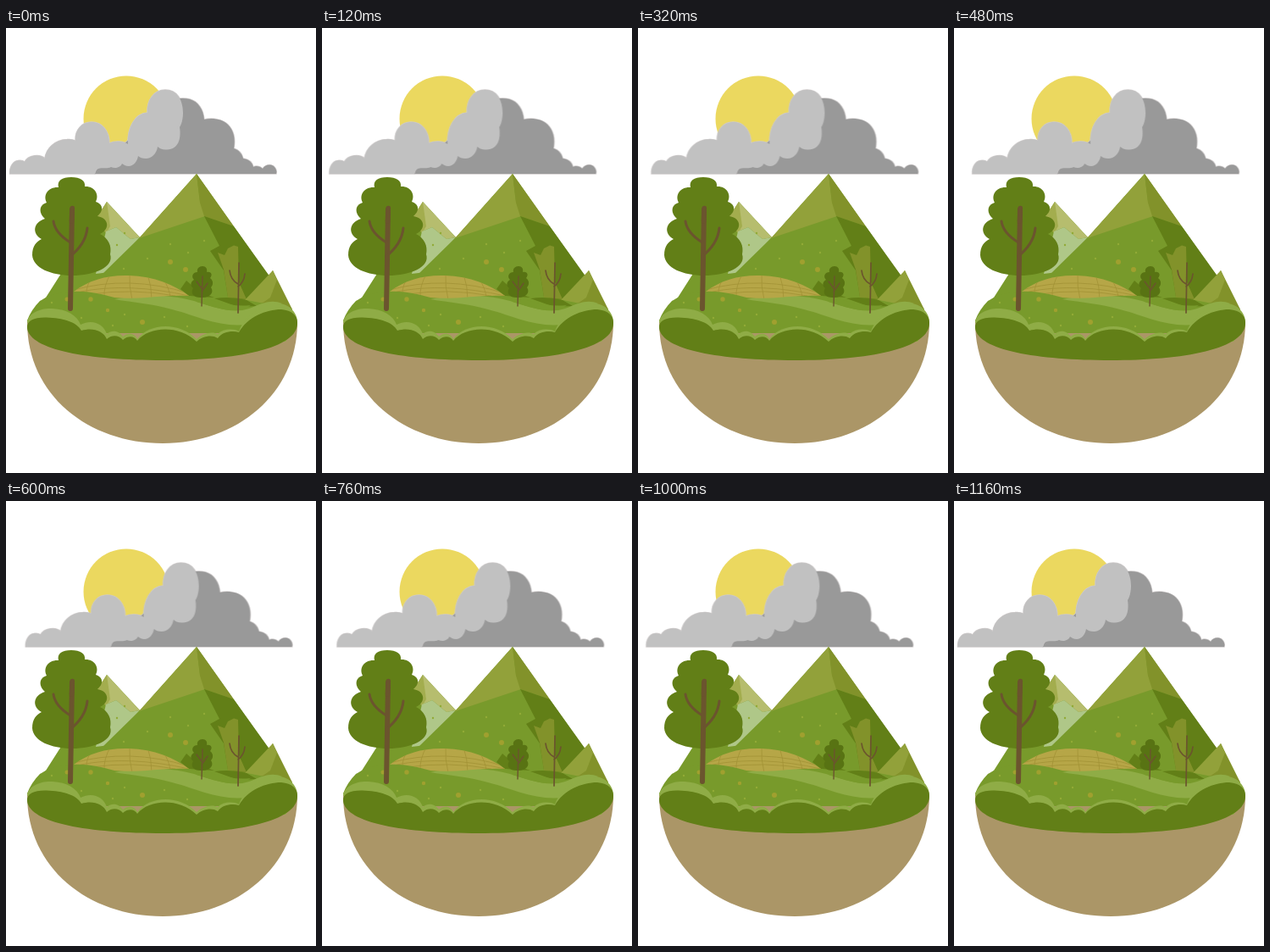
An HTML page for the animation above (1.2 s loop, 366 by 525 pixels).

```html
<!DOCTYPE html>
<html lang="en">
<head>
<meta charset="utf-8">
<title>Floating hills</title>
<style>
  html, body { margin: 0; width: 100%; height: 100%; overflow: hidden; background: #fff; }
  svg { display: block; width: 100vw; height: 100vh; }
  .deep { fill: #627f17; }
  .grass { fill: #789a2b; }
  .pale { fill: #8fac46; }
  .olive { fill: #92a13a; }
  .moss { fill: #82922a; }
  .wood { fill: none; stroke: #6b542e; stroke-linecap: round; stroke-linejoin: round; }
</style>
</head>
<body>
<svg viewBox="0 0 366 525">
  <defs>
    <path id="back" d="M105 172C106 168 108 166 110 164L190 90C197 83 208 82 217 84C227 87 233 96 234 108C243 106 255 107 262 114C269 121 271 131 269 142C275 144 279 149 280 154C287 155 291 159 292 164C295 162 300 163 303 166C305 162 311 160 316 163C319 166 320 169 319 172Z"/>
    <path id="front" d="M4.500 172C4 163 9 157 14 156.500C18 156 21 157 22 158C26 150 40 148 46 154C47 142 58 132 72 131.500C76 131 80 132 82 133C81 120 90 111 101 111C113 111 122 121 122 136C128 133 138 133 144 137C143 118 152 101 167 100C166 85 175 73 188 73C202 73 209 85 209 100C209 108 207 114 205 117C207 130 204 143 190 143.500C185 144 181 142 179 140C178 148 172 154 165 154Q159 154 156 151C155 158 150 163 145 163C141 163 139 161 137 160C135 165 128 166 124 164C119 167 110 163 106 168L105 172Z"/>
    <clipPath id="fieldClip"><use href="#field"/></clipPath>
    <path id="field" d="M80 311C98 297 121 291 145 292C175 293 199 303 216 316C190 314 153 321 128 318C110 313 95 310 80 311Z"/>
  </defs>

  <circle cx="142" cy="107" r="50.500" fill="#ebd85f"/>

  <g id="cloud">
    <g fill="none" stroke="#cfcbcb" stroke-width="1.400">
      <use href="#back"/><use href="#front"/>
    </g>
    <use href="#back" fill="#999"/>
    <use href="#front" fill="#c1c1c1"/>
  </g>

  <path d="M25 347C25 433 97 490 185 490C273 490 344 431 344 347Z" fill="#ab9667"/>

  <!-- far mountain -->
  <path class="grass" d="M119 205L158 247L170 300L60 330L40 328Q42 320 47 318Z"/>
  <path d="M119 205L158 247L147 249L130 235L118 240Z" fill="#b6bd6e"/>
  <path d="M119 205L123 234L118 242L106 225Z" fill="#a3ad4e"/>
  <path d="M118 240L130 235L147 249L158 247L122 288L106 290Z" fill="#afc788"/>

  <!-- main mountain -->
  <path class="grass" d="M225 172L338 332L330 350L40 350L112 292L158 247Z"/>
  <path class="olive" d="M225 172L157 248L235 222L229 205Z"/>
  <path class="moss" d="M225 172L269 234L234 222L229 206Z"/>
  <path class="deep" d="M234 222L269 234L312 294L284 321L262 317L257 286L241 263L252 257Z"/>
  <path class="moss" d="M250 265L258 268L262 260L269 256.500L274 258L275 300L284 320L262 318L257 285Z"/>

  <!-- right foothill -->
  <path class="moss" d="M315 286L338 332L278 330L300 307Z"/>
  <path class="olive" d="M315 286L282 321L296 329L312 318L320 297Z"/>
  <path class="deep" d="M206 308L213 298L222 306L229 312L246 318L216 316Z"/>

  <!-- meadow -->
  <path class="grass" d="M25 345Q30 332 40 322Q60 309 88 311L128 318Q178 308 225 318Q255 318 284 321L337 331L330 360L30 360Z"/>
  <path class="deep" d="M246 319Q266 316 284 321L296 328L274 329Z"/>
  <path class="pale" d="M128 320C164 313 202 315 228 324C250 331 269 337 287 331C300 326 312 319 326 325L284 350C250 353 227 340 196 332C172 325 151 324 128 320Z"/>
  <path class="grass" d="M225 318C247 320 262 330 289 327C272 338 253 332 225 323Z"/>

  <use href="#field" fill="#b6a647"/>
  <g clip-path="url(#fieldClip)" fill="none" stroke="#a19235" stroke-width=".800">
    <path d="M80 309Q145 291 216 313M88 311Q145 300 216 316M100 314Q150 307 200 316"/>
    <path d="M104 291Q94 303 95 315M124 289Q115 304 116 318M146 289Q145 305 149 321M167 290Q172 305 172 320M185 295Q193 307 194 318"/>
  </g>

  <g id="spots" fill="#a0a02f"></g>
  <g id="seeds" fill="#92ab37"></g>

  <!-- small trees -->
  <path d="M232 281C236 281 238 284 237 288C243 287 244 292 241 295C246 299 244 304 242 306C246 312 241 318 232 318C222 319 217 313 221 307C217 304 218 299 222 297C218 293 221 288 226 288C225 284 228 281 232 281Z" fill="#587313"/>
  <path class="wood" stroke-width="1.400" d="M232 293L231 328M225 299L231 307M238 301L231 311"/>
  <path class="wood" stroke-width="1.700" d="M275 277L274 336M264 286Q265 297 274 302M282 290Q281 300 274 305"/>

  <!-- hedge -->
  <path class="pale" d="M25 347C27 336 41 330 55 331C72 332 84 339 88 350C102 343 115 349 119 361C126 355 134 358 138 364C145 358 153 361 155 367C169 348 204 346 225 367C231 361 243 357 250 361C256 355 268 354 275 358C283 336 306 325 322 325C336 326 344 337 344 347L330 370H40Z"/>
  <path class="deep" d="M25 354C24 345 34 341 48 341.500C67 342 84 347 89 357C102 353 115 357 119 367C126 361 134 363 138 368C145 362 152 364 155 369C169 352 204 350 225 370C231 364 243 361 250 366C256 358 267 357 275 359C285 341 307 332 325 332C338 333 344 340 344 347C346 379 270 392 185 392C98 392 28 380 25 354Z"/>

  <!-- large tree -->
  <path class="deep" d="M77 176C88 176 94 180 93 187C103 186 111 195 106 205C113 207 117 214 108 222C123 225 122 238 111 243C121 248 125 257 123 267C128 282 104 292 78 292C53 292 32 283 31 268C31 257 36 252 42 249C31 243 31 230 46 225C39 219 38 209 48 206C43 196 51 187 62 188C60 180 66 176 77 176Z"/>
  <path class="wood" stroke-width="6" stroke-linecap="butt" d="M78 214L76 331"/>
  <path class="wood" stroke-width="5.500" d="M78.300 212.500L77.500 228"/>
  <path class="wood" stroke-width="3" d="M56 228Q58 242 76 253M96 236Q94 255 76 269"/>
</svg>
<script>
  const dot = (group, x, y, r) => {
    const c = document.createElementNS("http://www.w3.org/2000/svg", "circle");
    for (const [k, v] of Object.entries({ cx: x, cy: y, r })) c.setAttribute(k, v);
    document.getElementById(group).append(c);
  };
  [[72, 320, 2.5], [100, 320, 2.7], [120, 333, 2.2], [161, 347, 3],
   [194, 276, 3], [212, 285, 3]].forEach(p => dot("spots", ...p));
  [[54, 324], [89, 342], [126, 351], [140, 338], [187, 341], [214, 352],
   [194, 255], [234, 251], [215, 265], [167, 272], [139, 284], [131, 256], [140, 242]]
    .forEach(p => dot("seeds", ...p, 1.2));

  // Drift right, back left, then a one-step rest
  const LOOP = 1200, REACH = 20;
  const at = (ms, x, easing = "linear") =>
    ({ offset: ms / LOOP, transform: `translateX(${x}px)`, easing });
  document.getElementById("cloud").animate([
    at(0, 0, "steps(14, end)"),
    at(560, REACH, "steps(15, end)"),
    at(1160, 0),
    at(LOOP, 0)
  ], { duration: LOOP, iterations: Infinity });
</script>
</body>
</html>
```
